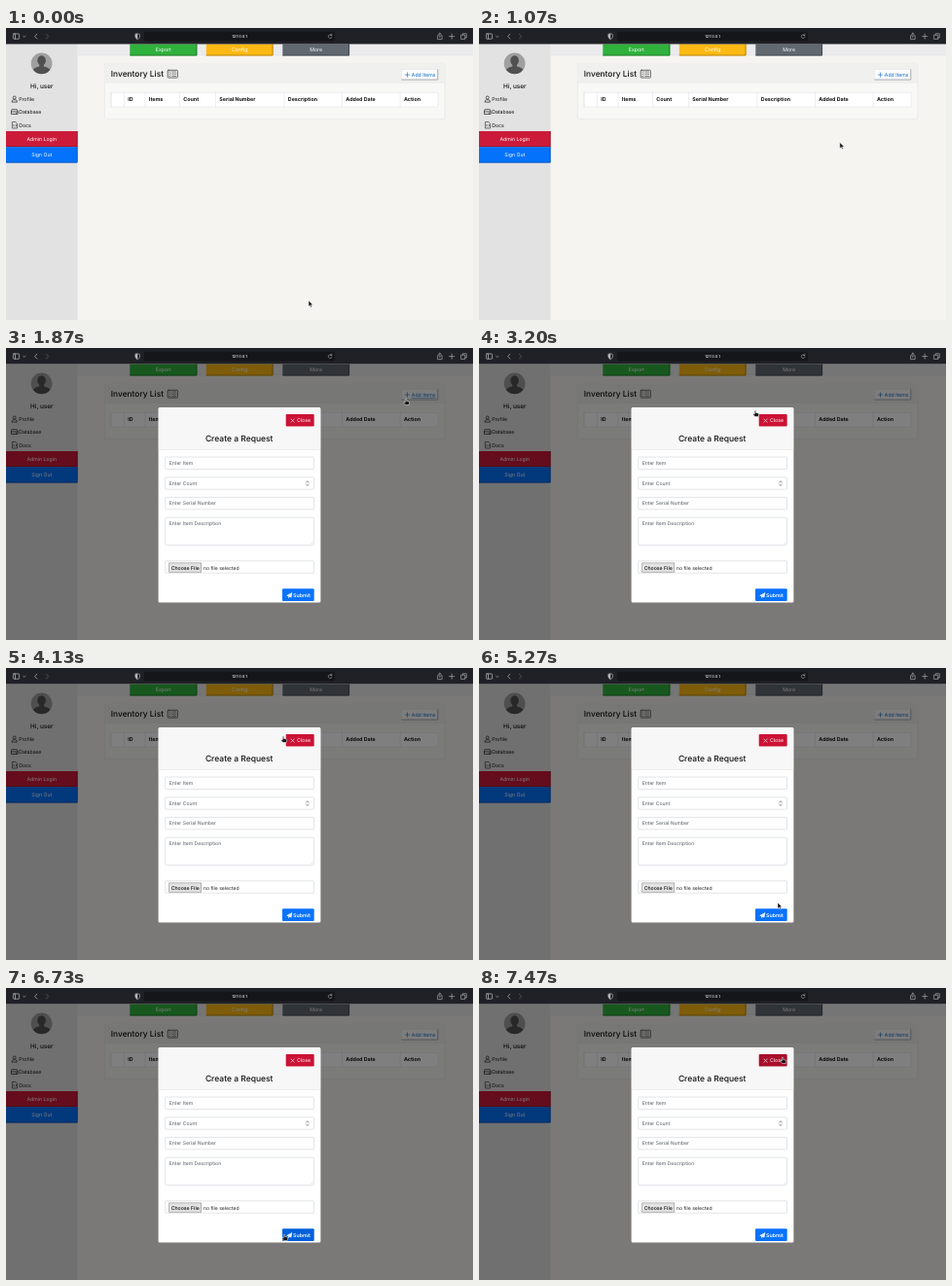
An HTML page for the animation above (7.54 s loop, 480 by 300 pixels).

```html
<!DOCTYPE html>
<html lang="en">
<head>
<meta charset="utf-8">
<title>Inventory</title>
<style>
  html, body { margin: 0; width: 100%; height: 100%; overflow: hidden; background: #f5f4f0; }
  svg { display: block; width: 480px; height: 300px; }
  text { font-family: Inter, "Open Sans", sans-serif; font-size: 5.2px; text-rendering: geometricPrecision; }
  .line { fill: none; stroke-linecap: round; stroke-linejoin: round; }
  #add.hover text { text-decoration: underline; }
  #add.press .face { fill: #c6cad1; stroke: #5b6470; }
  #close.hover .face { fill: #a90f2b; }
  #submit.hover .face { fill: #005fdb; }
</style>
</head>
<body>
<svg id="stage" viewBox="0 0 480 300"></svg>
<script>
const rect = (x, y, w, h, fill, extra = '') =>
  `<rect x="${x}" y="${y}" width="${w}" height="${h}" fill="${fill}" ${extra}/>`;
const line = (d, stroke, width = 0.7) =>
  `<path class="line" d="${d}" stroke="${stroke}" stroke-width="${width}"/>`;
const text = (x, y, s, { fill = '#111', size = 5.2, weight = 400, mid = false } = {}) =>
  `<text x="${x}" y="${y}" fill="${fill}" style="font-size:${size}px" font-weight="${weight}"` +
  `${mid ? ' text-anchor="middle"' : ''}>${s}</text>`;
const group = (id, body) => `<g id="${id}">${body}</g>`;

// Button with a raised look: dark right and bottom edges
const raised = (x, y, w, h, fill, edge, label) =>
  rect(x, y, w, h, fill) +
  line(`M${x + 0.4} ${y + h - 0.4}H${x + w - 0.4}V${y + 0.4}`, edge, 0.8) +
  text(x + w / 2, y + h / 2 + 1.9, label, { fill: '#fff', mid: true });

function toolbar() {
  const c = '#b9babd';
  return rect(0, 0, 480, 16.5, '#202126') +
    rect(142, 3.8, 196, 9.6, '#15161a', 'rx="2"') +
    text(240, 10.3, '127.0.0.1', { fill: '#f2f2f2', size: 4, weight: 500, mid: true }) +
    line('M8 6h5q.6 0 .6 .6v4q0 .6-.6 .6H8q-.6 0-.6-.6v-4q0-.6 .6-.6zM9.5 6v5.2', c) +
    line('M17.6 8.2l1.2 1.2 1.2-1.2', c, 0.6) +
    line('M31.8 6.2l-2.2 2.4 2.2 2.4', c) +
    line('M41.4 6.2l2.2 2.4-2.2 2.4', '#65666b') +
    line('M135.2 5.8l2.3 .8v2.4q-.3 1.8-2.3 2.7-2-.9-2.3-2.7V6.6z', c, 0.6) +
    `<path d="M135.2 5.8v5.9q-2-.9-2.3-2.7V6.6z" fill="${c}"/>` +
    line('M334.6 7.4a1.9 1.9 0 1 0 .4 1.6M334.9 6v1.6h-1.6', c, 0.5) +
    line('M444.6 7.8h-1v3.8h4.6V7.8h-1M445.9 9.6V5.2l-1.3 1.3M445.9 5.2l1.3 1.3', c, 0.6) +
    line('M458.2 6v5.2M455.6 8.6h5.2', c, 0.6) +
    line('M468 7.2h3.8v4.2H468zM469.4 7V5.8h3.9V10h-1.4', c, 0.6);
}

function sidebar() {
  const c = '#222';
  return rect(0, 16, 73.5, 284, '#e2e2e2') +
    `<clipPath id="round"><circle cx="36.6" cy="36.4" r="10.9"/></clipPath>
     <g clip-path="url(#round)">${rect(25, 25, 24, 24, '#a0a0a0')}
       <ellipse cx="36.6" cy="33.4" rx="4.3" ry="5.2" fill="#505050"/>
       <path d="M34.3 37h4.6v2.6q6 1.4 7 4.4v4H27.300v-4q1-3 7-4.400z" fill="#505050"/>
     </g>` +
    text(36.8, 61.5, 'Hi, user', { size: 6.4, weight: 500, mid: true }) +
    `<circle cx="8.700" cy="71.500" r="1.500" fill="none" stroke="${c}" stroke-width=".7"/>` +
    line('M6 75.700q.1-2 1.700-2h2q1.700 0 1.700 2z', c) +
    line('M6.300 83.700h5l.8 2.300v2.500H5.400V86zM5.400 86h6.700M10.300 87.300h.5', c) +
    line('M6.800 96.500h3l1.700 1.700v4.800H6.800zM8.300 99.200l-.8 .9 .8 .9M10 99.200l.8 .9-.8 .9', c, 0.6) +
    text(13.200, 74.900, 'Profile') + text(13.200, 88.200, 'Database') + text(13.200, 101.500, 'Docs') +
    raised(0, 106, 73.500, 16.200, '#cc1b3a', '#8c1128', 'Admin Login') +
    raised(0, 122.200, 73.500, 16.200, '#0472fb', '#0450b4', 'Sign Out');
}

function inventory() {
  const cols = [108, 121.5, 143, 178.500, 215.500, 286, 345.500, 405.200];
  const heads = ['', 'ID', 'Items', 'Count', 'Serial Number', 'Description', 'Added Date', 'Action'];
  const dark = '#333';
  return rect(73.500, 16, 406.500, 12, '#ebebee') +
    line('M73.500 28H480', '#dedee0', 0.500) +
    raised(127.300, 16.500, 69, 11.900, '#30b13d', '#1d7328', 'Export') +
    raised(205.800, 16.500, 68.700, 11.900, '#fdb913', '#ad7c08', 'Config') +
    raised(284.300, 16.500, 68.700, 11.900, '#616870', '#3c4148', 'More') +
    rect(101.300, 37, 349.700, 56.300, '#f8f8f6', 'stroke="#dfdfdc" stroke-width=".5" rx="1"') +
    rect(101.500, 37.200, 349.300, 18.800, '#f0f0ee') +
    line('M101.300 56.200H451', '#dcdcd9', 0.500) +
    text(107.800, 49.700, 'Inventory List', { size: 8.400, weight: 500 }) +
    line('M167 43.300h8.600q.8 0 .8 .8v6.200q0 .8-.8 .8H167q-.8 0-.8-.8v-6.200q0-.8 .8-.8z', dark) +
    [45, 47.200, 49.400].map(y => line(`M167.700 ${y}l.5 .5 .8-1M170.700 ${y}h4`, dark, 0.600)).join('') +
    group('add',
      rect(406.500, 42.600, 37.200, 10.400, '#fbfbfb', 'class="face" stroke="#e3e5e8" stroke-width=".5"') +
      line('M406.800 53.100H443.800V42.800', '#8b9199', 0.700) +
      line('M412.500 45.900v4.400M410.300 48.100h4.400', '#0a6ac8', 0.600) +
      text(416.800, 49.900, 'Add Items', { fill: '#0a6ac8' })) +
    rect(108, 66.200, 336, 14.800, '#fff', 'stroke="#dcdfe2" stroke-width=".5"') +
    cols.map((x, i) => line(`M${x} 66.200v14.800`, '#dcdfe2', 0.500) +
      text(x + 3.800, 75.400, heads[i], { size: 5.350, weight: 700 })).join('');
}

function modal() {
  const field = (y, h, label) =>
    rect(163.700, y, 152.800, h, '#fff', 'stroke="#cfd3d8" stroke-width=".6" rx="1"') +
    text(167.700, y + 8, label, { fill: '#555b62', size: 5.100 });
  return rect(0, 16.500, 480, 283.500, '#000', 'opacity=".5"') +
    rect(156.600, 61, 166.800, 200.500, '#fff', 'rx="1.500"') +
    rect(156.900, 61.300, 166.200, 43, '#f7f7f7', 'rx="1.200"') +
    line('M156.900 104.500H323.100', '#dcdcdc', 0.500) +
    group('close',
      rect(287.700, 67.900, 29, 12.700, '#cc1236', 'class="face" rx="1"') +
      line('M292.900 72.900l3.400 3.400M296.300 72.900l-3.400 3.400', '#fff', 0.600) +
      text(299, 76.300, 'Close', { fill: '#fff' })) +
    text(239.700, 96.300, 'Create a Request', { size: 8.500, weight: 500, mid: true }) +
    field(112, 12.500, 'Enter Item') +
    field(132.800, 12.400, 'Enter Count') +
    line('M308.600 138.100l1.300-1.400 1.300 1.400M308.600 140.100l1.300 1.400 1.300-1.400', '#444', 0.600) +
    field(153.400, 12.400, 'Enter Serial Number') +
    field(174.200, 28.300, 'Enter Item Description') +
    line('M313.800 201.300l1.500-1.500', '#aaa', 0.400) +
    field(218.800, 12.400, '') +
    rect(167.700, 220.900, 33, 9.300, '#e3e3e3', 'stroke="#8a8a8a" stroke-width=".6"') +
    text(184.200, 227.500, 'Choose File', { weight: 500, mid: true }) +
    text(202.900, 227.500, 'no file selected', { fill: '#222', size: 5.100 }) +
    group('submit',
      rect(284, 247.300, 32.700, 12.600, '#0a72fc', 'class="face" rx="1"') +
      `<path d="M288.300 254.300l5.900-3.200-.9 5.500-1.900-.8-1 1.400-.2-2z" fill="#fff"/>` +
      line('M290.200 255.200l2.800-2.900', '#0a72fc', 0.400) +
      text(295.100, 255.700, 'Submit', { fill: '#fff', weight: 600 }));
}

const cursor = group('cursor',
  `<path id="arrow" d="M0 0V6.200L1.500 4.900 2.400 7 3.500 6.500 2.600 4.500H4.500z"
     fill="#111" stroke="#fff" stroke-width=".5"/>
   <path id="hand" d="M-.7 .5q.7-.8 1.300 0v2l2.400 .5q.8 .2 .7 1.100l-.5 2.400H-.4L-2.200 4.200q-.1-.9 .9-.6l.6 .5z"
     fill="#111" stroke="#fff" stroke-width=".5"/>`);

const $ = id => document.getElementById(id);
$('stage').innerHTML = rect(0, 0, 480, 300, '#f5f4f0') + inventory() + sidebar() + toolbar() +
  group('modal', modal()) + cursor;

const LOOP = 7540, TICK = 1000 / 15, PRESS = 26, OPEN = 28;

// Pointer path: tick, x, y
const path = [
  [0, 311, 280], [4, 311, 280], [7, 337, 205], [11, 361, 138], [13, 361, 138],
  [19, 384, 92], [25, 411, 52], [36, 411, 52], [42, 350, 62], [45, 308, 71],
  [48, 284, 64], [51, 295, 83], [54, 325, 79], [57, 328, 57], [60, 302, 55],
  [62, 285, 70], [64, 301, 50], [66, 321, 67], [68, 310, 87], [71, 310, 87],
  [76, 311, 180], [79, 307, 241], [83, 290, 254], [86, 294, 242], [89, 313, 246],
  [91, 303, 255], [93, 292, 239], [95, 305, 244], [98, 314, 255], [101, 286, 253],
  [104, 302, 165], [107, 304, 103], [108, 303, 102], [110, 297, 86], [112, 312, 71], [114, 312, 71]
];

function pointAt(tick) {
  let i = 0;
  while (i < path.length - 2 && path[i + 1][0] <= tick) i++;
  const b = path[i], c = path[i + 1];
  const a = path[i - 1] || b, d = path[i + 2] || c;
  const u = (tick - b[0]) / (c[0] - b[0]);
  const still = b[1] === c[1] && b[2] === c[2];
  return [1, 2].map(k => still ? b[k] : b[k] +
    u * (c[k] - a[k] + u * (2 * a[k] - 5 * b[k] + 4 * c[k] - d[k] +
    u * (3 * (b[k] - c[k]) + d[k] - a[k]))) / 2);
}

const inside = ([x, y], l, t, r, b) => x >= l && x <= r && y >= t && y <= b;

function draw(time) {
  const tick = Math.floor((time % LOOP) / TICK + 0.06);
  const p = pointAt(tick), open = tick >= OPEN;
  const onAdd = inside(p, 406, 42, 444, 54) && tick <= 36;
  const onClose = open && inside(p, 287, 67, 317, 81);
  const onSubmit = open && inside(p, 284, 247, 317, 260);
  const nearClose = open && inside(p, 283, 63, 318, 82);
  const hand = onAdd || nearClose || onSubmit;

  $('modal').style.display = open ? '' : 'none';
  $('add').classList.toggle('hover', onAdd);
  $('add').classList.toggle('press', tick >= PRESS && !open);
  $('close').classList.toggle('hover', onClose);
  $('submit').classList.toggle('hover', onSubmit);
  $('arrow').style.display = hand ? 'none' : '';
  $('hand').style.display = hand ? '' : 'none';
  $('cursor').setAttribute('transform', `translate(${p[0].toFixed(2)} ${p[1].toFixed(2)})`);
}

const start = performance.now();
function loop() {
  draw(performance.now() - start);
  requestAnimationFrame(loop);
}
loop();
</script>
</body>
</html>
```
